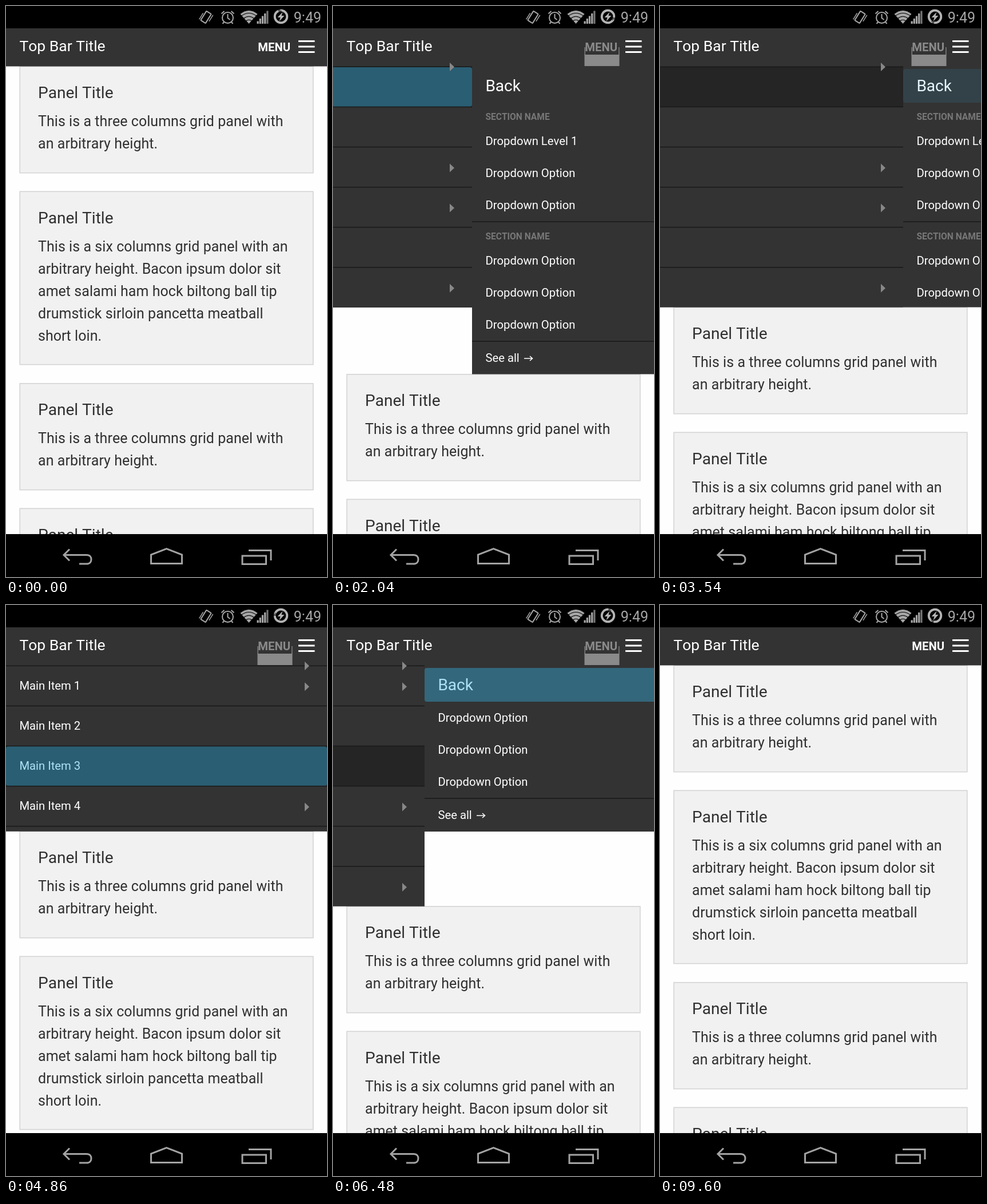
Animation, 561 px wide and 998 px high, one loop 9.66 s. Source, as an HTML page:

```html
<!DOCTYPE html>
<html lang="en">
<head>
<meta charset="utf-8">
<title>Top bar menu</title>
<style>
html, body { margin: 0; width: 100%; height: 100%; overflow: hidden; background: #fefefe; }
svg { display: block; width: 561px; height: 998px; font-family: Roboto, sans-serif; font-kerning: none; }
.icon { fill: none; stroke: #a3a3a3; stroke-width: 3; }
.small { stroke: #a6a6a6; stroke-width: 2; }
</style>
</head>
<body>
<svg id="stage" viewBox="0 0 561 998" xmlns="http://www.w3.org/2000/svg">
  <defs><clipPath id="menuClip"><rect id="clipBox" y="39" width="561" height="66"/></clipPath></defs>
  <rect width="561" height="998" fill="#fefefe"/>
  <g id="page"></g>
  <rect y="39" width="561" height="66.5" fill="#333"/>
  <g id="menu" clip-path="url(#menuClip)">
    <g id="main"></g>
    <g id="subA"></g>
    <g id="subB"></g>
  </g>
  <g id="bar"></g>

  <rect width="561" height="39" fill="#000"/>
  <g class="icon small">
    <g transform="rotate(32 349.5 19.5)">
      <rect x="344.5" y="10" width="10" height="19" rx="1"/>
      <path d="M341.500 16v13M358 10v13" stroke-width="1.5"/>
    </g>
    <circle cx="387.500" cy="20.500" r="9.500"/>
    <path d="M387.500 14v7l4 3M376.500 13.500l5-4.500M398.500 13.500l-5-4.500M381 28l-2.500 3M394 28l2.500 3"/>
  </g>
  <path d="M424.500 31L409.500 14Q424.500 2 439.500 14Z" fill="#a6a6a6"/>
  <path d="M411 17.500Q424.500 7.500 438 17.500M415 22Q424.500 14.500 434 22M419 26.500Q424.500 22 430 26.500" fill="none" stroke="#000" stroke-width="1.2"/>
  <g id="signal"></g>
  <circle cx="480.500" cy="18.500" r="10.800" fill="none" stroke="#555" stroke-width="3.500"/>
  <circle id="charge" cx="480.500" cy="18.500" r="10.800" fill="none" stroke="#b4b4b4" stroke-width="3.800" pathLength="360" stroke-dasharray="335 25"/>
  <path d="M483.500 10.500l-9 9.500h5l-2 7 9-10h-5z" fill="#b4b4b4"/>
  <text x="502.800" y="29" font-size="25" fill="#a6a6a6">9:49</text>

  <rect y="923" width="561" height="75" fill="#000"/>
  <g class="icon">
    <path d="M111 949.500L101 959.500L111 969.500M101 959.500H141C146.500 959.500 149 963 149 967.200S146.500 975 141 975H128"/>
    <path d="M253.500 974.500V959L280.500 948.500L307.500 959V974.500Z"/>
    <path d="M413 961H454.500V975.500H413ZM424 951.500H463V969"/>
  </g>
</svg>
<script>
const LOOP = 9660, STEP = 60, W = 561, SLIDE = 300;
const OPEN = 600, CLOSE = 7800;
const BAR_END = 105, MENU_END = 526, ROW = 70.1, INK = "#303030";
const TINT = "#33b5e5";

// touch: finger down, fit: bar height changes, slide: movement starts
const visits = [
  { row: 0, sub: "subA", end: 643,
    go: { touch: 1680, fit: 1760, slide: 1921 }, back: { touch: 3100, fit: 3210, slide: 3368.5 } },
  { row: 2, sub: "subB", end: 395,
    go: { touch: 4720, fit: 4840, slide: 5033 }, back: { touch: 6160, fit: 6260, slide: 6424.7 } }
];

const $ = id => document.getElementById(id);

function add(parent, tag, attrs, text) {
  const el = document.createElementNS("http://www.w3.org/2000/svg", tag);
  for (const k in attrs) el.setAttribute(k, attrs[k]);
  if (text) el.textContent = text;
  parent.appendChild(el);
  return el;
}
const box = (p, x, y, width, height, fill, more) =>
  add(p, "rect", { x, y, width, height, fill, ...more });
const label = (p, x, y, size, fill, text, more) =>
  add(p, "text", { x, y, "font-size": size, fill, ...more }, text);
const rule = (p, y) => box(p, 0, y - 0.8, W, 1.6, "#1a1a1a");
const shade = (p, y, h) => box(p, 0, y, W, h, TINT, { rx: 4, opacity: 0 });

function panel(y, height, lines) {
  const g = $("page");
  box(g, 24.2, y + 0.8, 512.6, height - 1.6, "#f1f1f1", { stroke: "#d4d4d4", "stroke-width": 1.6 });
  label(g, 56, y + 56, 28.05, INK, "Panel Title");
  lines.forEach((s, i) =>
    label(g, 56, y + 105 + i * 39, 24.93, INK, s, { "letter-spacing": 0.08 }));
}

const shortText = ["This is a three columns grid panel with", "an arbitrary height."];
const longText = ["This is a six columns grid panel with an", "arbitrary height. Bacon ipsum dolor sit",
  "amet salami ham hock biltong ball tip", "drumstick sirloin pancetta meatball", "short loin."];
panel(0, 187.5, shortText);
panel(218.5, 304, longText);
panel(554, 187.5, shortText);
panel(772.5, 187.5, shortText);

const main = $("main");
box(main, 0, BAR_END, W, MENU_END + 1 - BAR_END, "#333");
const rows = [0, 1, 2, 3, 4, 5].map(i => {
  const y = 106 + i * ROW;
  const bg = box(main, 0, y, W, ROW + 0.3, "#333");
  rule(main, y + 0.3);
  label(main, 23.4, y + 41.7, 20.26, "#fff", "Main Item " + (i + 1));
  return { y, bg, tint: shade(main, y + 1, 69) };
});
for (const i of [0, 2, 3, 5])
  rows[i].arrow = add(main, "path", { d: "M522 -7.500L530 0L522 7.500Z", fill: "#888" });

function submenu(id, end, build) {
  const g = $(id);
  box(g, 0, BAR_END, W, end + 1 - BAR_END, "#333");
  label(g, 23.4, 149, 28.05, "#fff", "Back");
  build(g);
  rule(g, end - 57);
  label(g, 23.4, end - 21, 20.26, "#fff", "See all");
  add(g, "path", { d: `M91 ${end - 27}h14m-4 -4l4.500 4l-4.500 4`, fill: "none", stroke: "#fff", "stroke-width": 1.6 });
  return shade(g, 110, 59);
}
const options = (g, y, names) =>
  names.forEach((s, i) => label(g, 23.4, y + i * 56.1, 20.26, "#fff", s));
const section = (g, y) =>
  label(g, 23.4, y, 15.58, "#777", "SECTION NAME", { "font-weight": 700 });
const option = "Dropdown Option";

visits[0].tint = submenu("subA", 643, g => {
  section(g, 198.7);
  options(g, 242.7, ["Dropdown Level 1", option, option]);
  rule(g, 377);
  section(g, 407.7);
  options(g, 451.7, [option, option, option]);
});
visits[1].tint = submenu("subB", 395, g => options(g, 204, [option, option, option]));

const bar = $("bar");
label(bar, 23.4, 78.7, 26.5, "#fff", "Top Bar Title");
const marks = add(bar, "g", {});
box(marks, 439.5, 85, 61, 20, "#8a8a8a");
box(marks, 439.5, 72, 1.3, 14, "#8a8a8a");
box(marks, 499.2, 72, 1.3, 14, "#8a8a8a");
const menuText = label(bar, 440.3, 78.7, 20.26, "#fff", "MENU", { "font-weight": 700 });
for (const y of [60, 69.5, 79]) box(bar, 511, y, 28.5, 3, "#fff");

for (let i = 0; i < 5; i++)
  box($("signal"), 438.5 + i * 4.2, 26.5 - i * 4.5, 3.2, 4.5 + i * 4.5, i < 4 ? "#a6a6a6" : "#777");

// cubic-bezier(0, 0, .58, 1)
function easeOut(x) {
  if (x <= 0) return 0;
  if (x >= 1) return 1;
  let lo = 0, hi = 1;
  for (let i = 0; i < 24; i++) {
    const s = (lo + hi) / 2;
    if (1.74 * s * s * (1 - s) + s * s * s < x) lo = s; else hi = s;
  }
  return lo * lo * (3 - 2 * lo);
}

const glow = (t, tap) => t < tap.touch ? 0
  : 0.4 * Math.min(1, Math.max(0, 1 - (t - tap.slide - 120) / 73));

function draw(time) {
  const t = Math.floor(time % LOOP / STEP) * STEP;
  const open = t >= OPEN && t < CLOSE;
  let end = open ? MENU_END : BAR_END, shift = 0, active = -1, moved = -1;

  for (const v of visits) {
    const { go, back } = v;
    if (t >= go.touch) active = v.row;
    if (t >= go.fit && t < back.fit) end = v.end;
    const live = t >= go.fit && t < back.slide + SLIDE;
    if (live) moved = v.row;
    const p = easeOut((t - go.slide) / SLIDE) - easeOut((t - back.slide) / SLIDE);
    const dx = Math.round(p * W);
    shift += dx;
    $(v.sub).setAttribute("display", live ? "inline" : "none");
    $(v.sub).setAttribute("transform", `translate(${W - dx} 0)`);
    rows[v.row].tint.setAttribute("opacity", glow(t, go));
    v.tint.setAttribute("opacity", glow(t, back));
  }

  main.setAttribute("transform", `translate(${-shift} 0)`);
  rows.forEach((r, i) => {
    r.bg.setAttribute("fill", i === active ? "#252525" : "#333");
    if (r.arrow) r.arrow.setAttribute("transform", `translate(0 ${i === moved ? 106.5 : r.y + 36.7})`);
  });
  $("menu").setAttribute("display", open ? "inline" : "none");
  $("clipBox").setAttribute("height", end - 38.5);
  $("page").setAttribute("transform", `translate(0 ${end})`);
  marks.setAttribute("display", open ? "inline" : "none");
  menuText.setAttribute("fill", open ? "#8a8a8a" : "#fff");
  $("charge").setAttribute("transform", `rotate(${t * 0.06 - 90} 480.500 18.500)`);
}

function tick() {
  draw(performance.now());
  requestAnimationFrame(tick);
}
tick();
</script>
</body>
</html>
```
